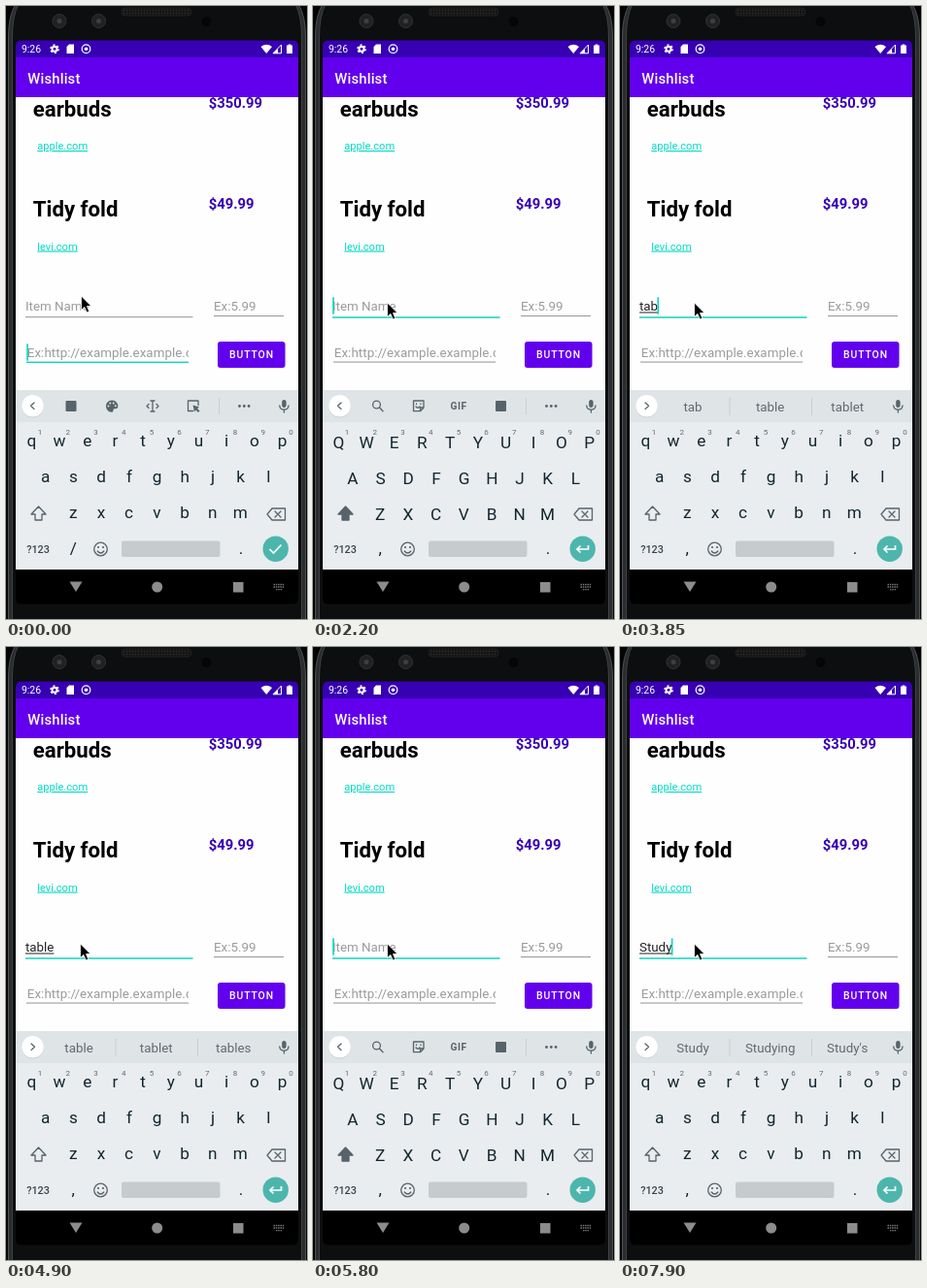
Write an HTML page that moves like this. It is 310 px wide and 632 px high and loops after 8000 ms.

```html
<!DOCTYPE html>
<html lang="en">
<head>
<meta charset="utf-8">
<title>Wishlist</title>
<style>
  html, body { margin: 0; width: 100%; height: 100%; overflow: hidden; background: #000; }
  svg { display: block; width: 310px; height: 632px; font-family: Roboto, sans-serif; }
  text { white-space: pre; }
  .name { font-weight: 700; font-size: 22.2px; }
  .price { font-weight: 700; font-size: 14.8px; fill: #3700b3; }
  .link { font-size: 11.1px; fill: #03dac5; text-decoration: underline; }
  .field { font-size: 13.34px; fill: #222; }
  .hint { font-size: 13.34px; fill: #9b9b9b; }
  .key { font-size: 17.2px; fill: #14262e; text-anchor: middle; }
  .digit { font-size: 8px; fill: #5f6a70; text-anchor: middle; }
  .word { font-size: 13.34px; fill: #5f6a70; text-anchor: middle; }
  .line { fill: none; stroke: #57636a; stroke-width: 1.3; stroke-linecap: round; stroke-linejoin: round; }
  .solid { fill: #57636a; }
</style>
</head>
<body>
<svg viewBox="0 0 310 632" xmlns="http://www.w3.org/2000/svg">
  <defs>
    <clipPath id="page"><rect x="10" y="94" width="291" height="302"/></clipPath>
    <clipPath id="urlClip"><rect x="21" y="344" width="167" height="24"/></clipPath>
    <pattern id="mesh" width="3" height="3" patternUnits="userSpaceOnUse">
      <rect width="3" height="3" fill="#111"/><circle cx="1.5" cy="1.5" r=".9" fill="#2c2e2f"/>
    </pattern>
  </defs>

  <!-- phone body -->
  <rect width="310" height="632" fill="#050505"/>
  <path d="M10 -2Q2.500 10 2.500 32V640H308.500V32Q308.500 10 301 -2Z" fill="#2a2c2d" stroke="#4e5254"/>
  <path d="M13 -2Q6.500 10 6.500 32V640H304.500V32Q304.500 10 298 -2Z" fill="#0d0e0f" stroke="#3e4143"/>
  <rect x="119" y="2" width="72" height="8" rx="4" fill="url(#mesh)" stroke="#1f2021"/>
  <g fill="#1f2123" stroke="#303335">
    <circle cx="55" cy="15.500" r="7"/><circle cx="95.500" cy="15.500" r="7"/>
  </g>
  <g fill="#3b4044"><circle cx="55" cy="15.500" r="2.500"/><circle cx="95.500" cy="15.500" r="2.500"/></g>
  <circle cx="206.500" cy="16" r="5" fill="#060607"/>

  <!-- page -->
  <rect x="10" y="60" width="291" height="400" fill="#fefefe"/>
  <g clip-path="url(#page)">
    <text class="name" x="27.800" y="113.500">earbuds</text>
    <text class="price" x="208.800" y="105.300">$350.99</text>
    <text class="link" x="32.300" y="148">apple.com</text>
    <text class="name" x="27.800" y="217">Tidy fold</text>
    <text class="price" x="208.800" y="208.800">$49.99</text>
    <text class="link" x="32.300" y="251.500">levi.com</text>
  </g>
  <text class="hint" x="20" y="314.300" id="nameHint">Item Name</text>
  <text class="field" x="20" y="314.300" id="typed"></text>
  <path id="typedLine" stroke="#222" stroke-width="1"/>
  <rect id="nameLine" x="20" width="172.500"/>
  <text class="hint" x="214" y="314.300">Ex:5.99</text>
  <rect x="214" y="319.200" width="72" height=".9" fill="#868686"/>
  <g clip-path="url(#urlClip)"><text class="hint" x="21.800" y="361.500" letter-spacing=".06">Ex:http://example.example.com</text></g>
  <rect id="urlLine" x="21" width="167"/>
  <rect id="caret" width="1.700" height="17.400" fill="#14d3c1"/>
  <rect x="218" y="346.500" width="69.500" height="27" rx="3" fill="#000" opacity=".12"/>
  <rect x="218" y="346" width="69.500" height="27" rx="3" fill="#6200ee"/>
  <text x="253" y="363.300" text-anchor="middle" font-size="10.400" font-weight="500" letter-spacing=".93" fill="#fff">BUTTON</text>

  <!-- bars -->
  <rect x="10" y="53" width="291" height="41" fill="#6200ee"/>
  <path d="M10 53V41Q10 35.500 16 35.500H295Q301 35.500 301 41V53Z" fill="#3700b3"/>
  <text x="22.300" y="79.700" font-size="14.800" font-weight="500" letter-spacing=".18" fill="#fff">Wishlist</text>
  <text x="16" y="48" font-size="10.400" fill="#fff">9:26</text>
  <g fill="#fff">
    <circle cx="50" cy="44.200" r="2.500" fill="none" stroke="#fff" stroke-width="2"/>
    <circle cx="50" cy="44.200" r="4.100" fill="none" stroke="#fff" stroke-width="1.500" stroke-dasharray="2.150"/>
    <path d="M65 39.500H70V49H62.500V42Z"/>
    <circle cx="82.500" cy="44.200" r="4.300" fill="none" stroke="#fff" stroke-width="1.200"/>
    <circle cx="82.500" cy="44.200" r="1.800"/>
    <path d="M262.500 42Q268.200 37.500 274 42L268.200 49Z"/>
    <path d="M283.500 40V48.800H275Z" fill="none" stroke="#fff"/><path d="M280 44V48.800H275Z"/>
    <path d="M289 40.500H290.700V39.500H293.300V40.500H295V49H289Z"/>
  </g>

  <!-- keyboard -->
  <rect x="10" y="396" width="291" height="185" fill="#e9edf0"/>
  <rect x="10" y="396" width="291" height="33" fill="#dfe4e6"/>
  <circle cx="27.500" cy="412.800" r="11.500" fill="#000" opacity=".1"/>
  <circle cx="27.500" cy="412.300" r="11.300" fill="#fff"/>
  <path id="chevron" class="line"/>
  <g id="mic">
    <rect class="solid" x="284.200" y="406" width="4.400" height="8" rx="2.200"/>
    <path class="line" d="M281.800 412Q282 416.200 286.400 416.200Q290.800 416.200 291 412M286.400 416.500V419"/>
  </g>
  <g id="icons">
    <path d="M219.500 404V421" stroke="#c9ced2"/>
    <g class="solid"><circle cx="240.500" cy="412.500" r="1.400"/><circle cx="245.300" cy="412.500" r="1.400"/><circle cx="250.100" cy="412.500" r="1.400"/></g>
    <rect id="square" class="solid" y="407" width="11" height="11" rx="1"/>
    <g id="editTools">
      <path class="solid" d="M109 406.500C101 406.500 101 418.700 109 418.700C111.500 418.700 109.500 415.500 111.500 415.200H113C117.500 415 115.500 406.500 109 406.500Z"/>
      <g fill="#dfe4e6"><circle cx="105.500" cy="412.500" r="1"/><circle cx="107.300" cy="409.500" r="1"/><circle cx="110.700" cy="409.500" r="1"/><circle cx="112.800" cy="412.200" r="1"/></g>
      <path class="line" d="M149 407H153M151 407V418M149 418H153M147 410.500L145 412.500L147 414.500M155 410.500L157 412.500L155 414.500"/>
      <path class="line" d="M198 411.500V407H187.500V417.500H192.500"/>
      <path class="solid" d="M192.500 411.500L199 413.500L197 415L199.500 417.500L198 419L195.500 416.500L194 418.500Z"/>
    </g>
    <g id="mediaTools">
      <circle class="line" cx="65.500" cy="411" r="3.900"/><path class="line" d="M68.500 414L72 417.700"/>
      <path class="line" d="M103.500 407H114V414L110.500 417.700H103.500ZM114 414H110.500V417.700M106 413Q108 415.500 110 413M106.500 410V410.500M111 410V410.500"/>
      <text class="solid" x="150" y="416.300" font-size="10.200" font-weight="700" letter-spacing=".5" text-anchor="middle">GIF</text>
    </g>
  </g>
  <g id="words">
    <path d="M113 404V422M197.500 404V422" stroke="#c9ced2"/>
  </g>
  <g id="keys"></g>
  <path id="shift" class="line" d="M33.500 516L41 524H37V530H30V524H26Z"/>
  <path class="line" d="M274 518H287.500V530H274L269 524ZM277 521L283 527M283 521L277 527"/>
  <text x="33" y="563.700" font-size="10.800" font-weight="500" text-anchor="middle" fill="#38444a">?123</text>
  <circle class="line" cx="97.500" cy="560" r="6.800"/>
  <path class="line" d="M94.200 562Q97.500 566 100.800 562"/>
  <g class="solid"><circle cx="95" cy="558" r="1.100"/><circle cx="100" cy="558" r="1.100"/></g>
  <rect x="119" y="551.500" width="101.500" height="16.500" rx="2" fill="#c6cbce"/>
  <circle cx="277.700" cy="559.700" r="13.200" fill="#4db6ac"/>
  <path id="action" fill="none" stroke="#fff" stroke-width="1.700"/>

  <!-- navigation -->
  <path d="M10 581H301V611Q301 616.500 295 616.500H16Q10 616.500 10 611Z" fill="#000"/>
  <g fill="#8c8c8c">
    <path d="M65.500 593.500H78.500L72 604Z"/><circle cx="155.700" cy="599" r="5.500"/><rect x="234" y="594" width="10.500" height="10.500"/>
  </g>
  <path d="M275.500 596.500H287M275.500 599H287M278 601.700H284.500" stroke="#777" stroke-width="1.300" stroke-dasharray="1.500 .8"/>

  <path id="mouse" d="M0 0V14.500L3.300 11.400L5.700 17L8.200 15.900L5.900 10.500H10.400Z" fill="#000" stroke="#fff" stroke-width=".8"/>
</svg>
<script>
const LOOP = 8000;
const $ = id => document.getElementById(id);
const set = (node, attrs) => { for (const k in attrs) node.setAttribute(k, attrs[k]); };
const show = (id, on) => set($(id), { visibility: on ? 'visible' : 'hidden' });

function addText(parent, cls, x, y, str = '') {
  const node = document.createElementNS('http://www.w3.org/2000/svg', 'text');
  set(node, { class: cls, x, y });
  node.textContent = str;
  parent.appendChild(node);
  return node;
}

const letters = [];
[['qwertyuiop', 26.3], ['asdfghjkl', 40.8], ['zxcvbnm', 69.2]].forEach(([row, left], r) => {
  [...row].forEach((ch, i) => {
    const x = left + i * 28.7, y = 454 + r * 37;
    letters.push({ node: addText($('keys'), 'key', x, y), ch, y });
    if (r === 0) addText($('keys'), 'digit', x + 8.8, 442, (i + 1) % 10);
  });
});
const comma = addText($('keys'), 'key', 69.2, 565);
addText($('keys'), 'key', 242, 565, '.');
const slots = [75, 154.7, 234.2].map(x => addText($('words'), 'word', x, 417.6));

// A leading * marks the autocorrect choice.
const suggestions = {
  '': 't *the to', t: 't *the to', ta: 'ta *take talk', tab: 'tab table tablet',
  tabl: 'tabl *table tablet', table: 'table tablet tables',
  S: 'S *So Sorry', St: 'St *Still Stay', Stu: 'Stu *Study Stuff',
  Stud: 'Stud *Study Student', Study: "Study Studying Study's"
};
const typing = [
  [0, ''], [3400, 't'], [3550, 'ta'], [3850, 'tab'], [4150, 'tabl'], [4450, 'table'],
  [5050, 'tabl'], [5200, 'tab'], [5350, 'ta'], [5500, 't'], [5650, ''],
  [6550, 'S'], [7000, 'St'], [7300, 'Stu'], [7450, 'Stud'], [7900, 'Study']
];
const pointer = [[0, [77.5, 299]], [150, [77.5, 301]], [300, [77, 303.5]], [440, [76.6, 306]]];
const caretOff = [[440, 860], [1600, 2200], [2650, 3250], [4900, 5050], [6100, 6550]];
const capitals = [[1300, 3400], [5800, 6550]];

const at = (track, t) => track.filter(k => k[0] <= t).pop()[1];
const within = (spans, t) => spans.some(([a, b]) => t >= a && t < b);

function underline(id, y, active) {
  set($(id), { y, height: active ? 1.5 : 0.9, fill: active ? '#14d3c1' : '#868686' });
}

function draw(t) {
  const text = at(typing, t);
  const upper = within(capitals, t);
  const urlMode = t < 1300;
  const urlFocus = t < 1150;
  const tools = urlMode || upper;

  $('typed').textContent = text;
  const width = text ? $('typed').getComputedTextLength() : 0;
  set($('typedLine'), { d: `M20 316H${20 + width}` });
  show('typedLine', text);
  show('nameHint', !text);
  underline('nameLine', 320.3, t >= 1000);
  underline('urlLine', 366.6, urlFocus);
  set($('caret'), urlFocus ? { x: 21.2, y: 348.3 } : { x: 20.1 + Math.max(0, width - 0.8), y: 300.3 });
  show('caret', !within(caretOff, t));
  set($('mouse'), { transform: `translate(${at(pointer, t)})` });

  for (const { node, ch, y } of letters) {
    node.textContent = upper ? ch.toUpperCase() : ch;
    set(node, { y: upper ? y + 1.5 : y });
  }
  set($('shift'), { style: upper ? 'fill:#57636a' : '' });
  comma.textContent = urlMode ? '/' : ',';
  set($('action'), {
    d: urlMode ? 'M271.500 560L275.500 564L283.500 555.500' : 'M283.500 556V560H272M275.500 556.500L272 560L275.500 563.500'
  });

  set($('chevron'), { d: tools ? 'M29 409L25.500 412.300L29 415.600' : 'M26 409L29.500 412.300L26 415.600' });
  show('icons', tools);
  show('words', !tools);
  show('editTools', urlMode);
  show('mediaTools', upper);
  set($('square'), { x: urlMode ? 61.5 : 188 });
  suggestions[text].split(' ').forEach((word, i) => {
    const bold = word[0] === '*';
    slots[i].textContent = word.replace('*', '');
    set(slots[i], { style: bold ? 'font-weight:700;fill:#000' : '' });
  });
}

function tick() {
  draw(performance.now() % LOOP);
  requestAnimationFrame(tick);
}
tick();
</script>
</body>
</html>
```
